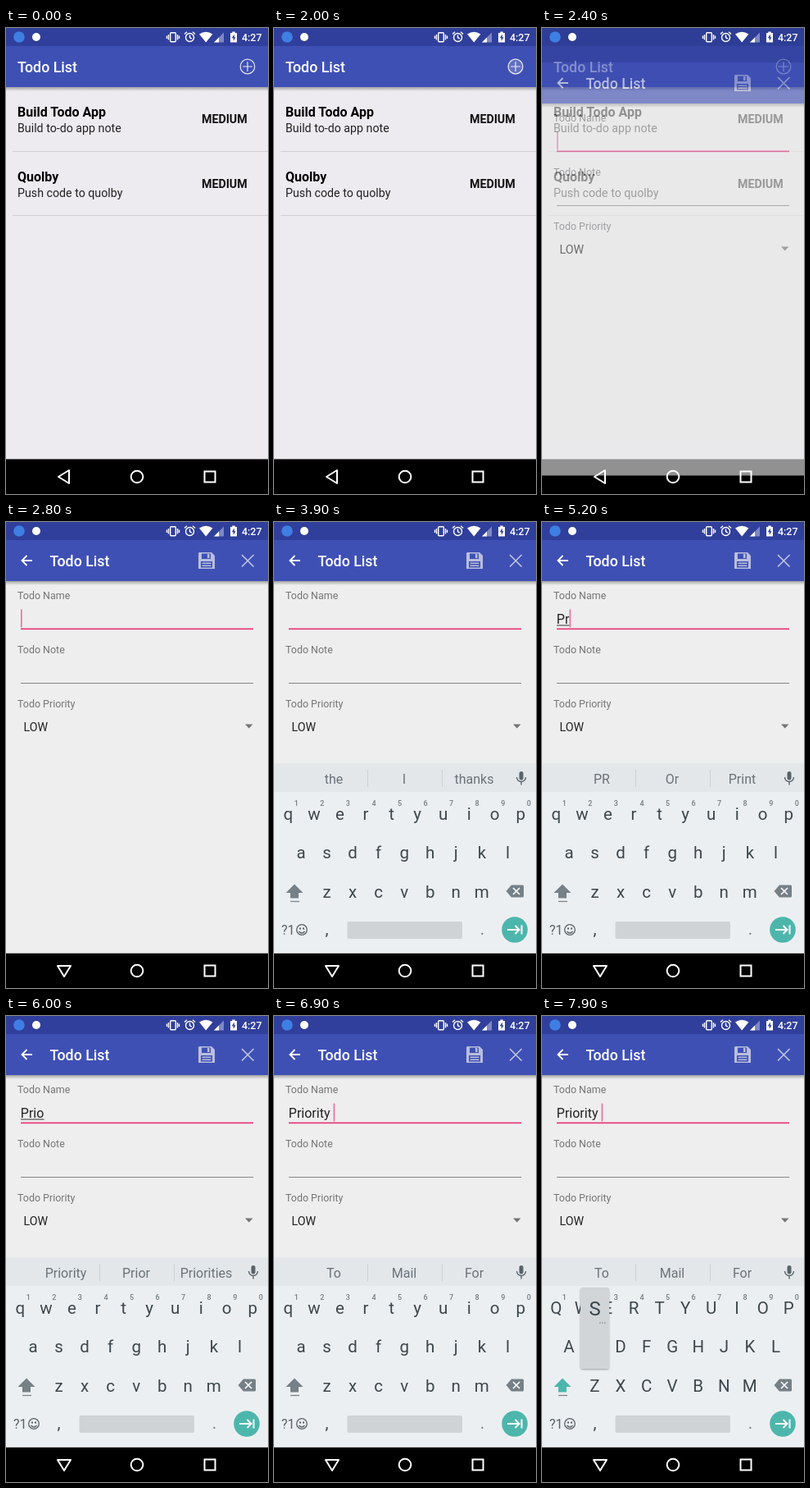
Recreate the animation shown at these times as an HTML page. Size 320x568 px, loop 8000 ms.

```html
<!DOCTYPE html>
<html lang="en">
<head>
<meta charset="utf-8">
<title>Todo List</title>
<style>
  html, body { margin: 0; width: 100%; height: 100%; overflow: hidden; background: #000; }
  svg { display: block; width: 100vw; height: 100vh; font-family: Roboto, sans-serif; }
  text { white-space: pre; }
  .title { font-size: 17.78px; font-weight: 500; fill: #fff; }
  .name { font-size: 16px; font-weight: 700; }
  .body { font-size: 14.22px; fill: #222; }
  .level { font-size: 14.22px; font-weight: 700; fill: #111; }
  .label { font-size: 12.44px; fill: #757575; }
  .mid { text-anchor: middle; }
  .word { font-size: 16px; fill: #697379; }
  .key { font-size: 20.5px; fill: #3c474d; }
  .hint { font-size: 9px; font-weight: 500; fill: #737d82; }
  .line { fill: none; stroke: #fff; }
</style>
</head>
<body>
<svg viewBox="0 0 320 568">
  <defs>
    <linearGradient id="shade" x2="0" y2="1">
      <stop stop-opacity=".32"/><stop offset="1" stop-opacity="0"/>
    </linearGradient>
    <clipPath id="above-nav"><path d="M0 0H320V525.5H0Z"/></clipPath>
    <filter id="lift" x="-20%" y="-10%" width="140%" height="120%">
      <feDropShadow dx="0" dy="1" stdDeviation="1" flood-opacity=".35"/>
    </filter>
    <g id="bars">
      <rect width="320" height="22" fill="#303f9b"/>
      <rect y="22" width="320" height="50" fill="#3f50b5"/>
      <rect y="72" width="320" height="5" fill="url(#shade)"/>
    </g>
  </defs>

  <g id="list">
    <rect width="320" height="525.5" fill="#edebef"/>
    <use href="#bars"/>
    <text class="title" x="14" y="54">Todo List</text>
    <g class="line" stroke-width="1.2" opacity=".85">
      <circle cx="295" cy="47" r="8.8"/><path d="M289 47h12M295 41v12"/>
    </g>
    <circle id="ripple" cx="295" cy="47" fill="#fff" opacity=".18"/>
    <text class="name" x="14" y="108">Build Todo App</text>
    <text class="body" x="14" y="127">Build to-do app note</text>
    <text class="level" x="239" y="116">MEDIUM</text>
    <text class="name" x="14" y="186.5">Quolby</text>
    <text class="body" x="14" y="205.5">Push code to quolby</text>
    <text class="level" x="239" y="194.5">MEDIUM</text>
    <path d="M8 150.5H320M8 228.5H320" stroke="#d2d0d4"/>
    <rect id="dim" width="320" height="525.5"/>
  </g>

  <g id="form">
    <rect width="320" height="525.5" fill="#eee"/>
    <use href="#bars"/>
    <path class="line" stroke-width="1.8" d="M32 47H19.500M25.500 41l-6 6 6 6"/>
    <text class="title" x="53.500" y="54">Todo List</text>
    <g fill="#b9bedf">
      <path fill-rule="evenodd" d="M236 37h15l4 4v16h-20v-19zM239 38.500v6.500h11v-6.500zM238 48v7.500h14V48z"/>
      <path d="M246 39h2.500v5h-2.500zM239.500 49.500h11v1.500h-11zM239.500 52.500h11v1.500h-11z"/>
    </g>
    <path d="M288 40l14.500 14.500M302.500 40L288 54.500" stroke="#c5c9e6" stroke-width="1.5"/>
    <text class="label" x="14" y="94">Todo Name</text>
    <text class="label" x="14" y="160">Todo Note</text>
    <text class="label" x="14" y="226">Todo Priority</text>
    <rect x="18" y="129.500" width="284" height="1.700" fill="#e5397b"/>
    <rect x="18" y="196" width="284" height="1" fill="#858585"/>
    <text id="field" x="17.800" y="124" font-size="16" fill="#222"></text>
    <rect id="composing" x="18" y="125.500" height="1" fill="#333"/>
    <rect id="cursor" y="106.500" width="1.600" height="22" fill="#ee6c9c"/>
    <text class="body" x="21.500" y="255">LOW</text>
    <path d="M292 246.500h9.500l-4.750 5z" fill="#757575"/>
  </g>

  <g clip-path="url(#above-nav)">
    <g id="keyboard">
      <rect y="294.500" width="320" height="231" fill="#eceff1"/>
      <rect y="294.500" width="320" height="34.500" fill="#e4e7ea"/>
      <rect id="word-press" x="32" y="294.500" width="82" height="34.500" fill="#d0d5d9"/>
      <path d="M114.500 302v21M205.500 302v21" stroke="#cbd0d3"/>
      <g id="words"></g>
      <rect x="299.500" y="304" width="5" height="10.500" rx="2.500" fill="#59646a"/>
      <path d="M296.500 311a5.500 5.500 0 0 0 11 0M302 316.500v4" class="line" style="stroke:#59646a" stroke-width="1.400"/>
      <rect id="shift-press" x="6" y="433" width="38" height="36" rx="3" fill="#d3d7da"/>
      <path id="shift" d="M25 441.500l10.500 10.500h-5.500v6.500h-10V452h-5.500z"/>
      <path d="M20 462.500h11" stroke="#7a858a" stroke-width="1.300"/>
      <g id="keys"></g>
      <path d="M290 442.500h13.500q1.500 0 1.500 1.500v12q0 1.500-1.500 1.500H290l-6.500-7.500z" fill="#758087"/>
      <path class="line" stroke-width="1.600" d="M292 446l8 8M300 446l-8 8"/>
      <text x="9" y="503" font-size="16" fill="#566167">?1</text>
      <g fill="none" stroke="#566167" stroke-width="1.300">
        <circle cx="34" cy="497" r="6.300"/><path d="M30.500 499q3.500 4 7 0"/>
      </g>
      <path d="M31 494.500h2v2h-2zM35 494.500h2v2h-2z" fill="#566167"/>
      <rect id="space" x="89.500" y="487" width="140.500" height="21" rx="2"/>
      <text class="key mid" x="64.500" y="503">,</text>
      <text class="key mid" x="254.500" y="503" style="fill:#758087">.</text>
      <circle cx="294" cy="497" r="15.800" fill="#4db6ac"/>
      <path class="line" stroke-width="2" d="M285 497h14M294.500 492l5 5-5 5M302.500 491.500v11"/>
      <g id="popup">
        <rect x="-17.500" y="-79" width="35" height="99" rx="3" fill="#d1d5d8" filter="url(#lift)"/>
        <text id="popup-letter" class="mid" y="-45.500" font-size="24" fill="#37474f"></text>
        <path d="M5.500-36h8" stroke="#8a9499" stroke-width="1.500" stroke-dasharray="1.500 1.500"/>
      </g>
    </g>
  </g>

  <g class="line" stroke-width="2">
    <path id="back" d="M-7 0L6-8V8Z" stroke-linejoin="round"/>
    <circle cx="160" cy="547" r="7.300"/>
    <rect x="242.500" y="540.500" width="13" height="13"/>
  </g>

  <g id="status">
    <circle cx="16" cy="11" r="6.800" fill="#3f7fe4"/>
    <circle cx="37" cy="11" r="5" fill="#fff"/>
    <g class="line" stroke-width="1.400">
      <rect x="200.700" y="5.700" width="6.600" height="11" rx="1"/>
      <path d="M198.500 8v6.500M196.500 9.500v3.500M209.500 8v6.500M211.500 9.500v3.500"/>
      <circle cx="224.500" cy="11.500" r="5"/>
      <path d="M224.500 8.500v3.200l2.300 1.500M218 7.500l3-2.700M231 7.500l-3-2.700"/>
    </g>
    <path d="M236 7.500q8.200-5.500 16.400 0L244.200 17.500z" fill="#fff"/>
    <path d="M254 17.500L266 5.500v12z" fill="#7f88c5"/>
    <path d="M254 17.500l6-6v6z" fill="#fff"/>
    <path d="M274 6h2.300V4.500h3.400V6h2.300v11.500h-8z" fill="#fff"/>
    <path d="M278.800 7.500l-3 4.800h1.900v3.700l2.800-4.800h-1.700z" fill="#303f9b"/>
    <text x="288" y="15.800" font-size="12.440" font-weight="500" fill="#fff">4:27</text>
  </g>
</svg>
<script>
const LOOP = 8000;
const $ = id => document.getElementById(id);
const make = (parent, cls, x, y, content = '') => {
  const node = document.createElementNS('http://www.w3.org/2000/svg', 'text');
  node.setAttribute('class', cls);
  node.setAttribute('x', x);
  node.setAttribute('y', y);
  node.textContent = content;
  return parent.appendChild(node);
};
const set = (id, attrs) => {
  for (const name in attrs) $(id).setAttribute(name, attrs[name]);
};
const show = (id, on) => set(id, { visibility: on ? 'visible' : 'hidden' });

// Each row: start time, then the values held from there on.
const at = (rows, t) => rows.findLast(row => row[0] <= t).slice(1);
const during = (t, ...spans) => spans.some(([from, to]) => t >= from && t < to);

const keys = {};
[['qwertyuiop', 17.3, 363], ['asdfghjkl', 33, 410], ['zxcvbnm', 64.5, 458]].forEach(([row, left, y], r) => {
  [...row].forEach((char, i) => {
    const x = left + i * 31.55;
    keys[char] = { x, y, node: make($('keys'), 'key mid', x, y) };
    if (!r) make($('keys'), 'hint mid', x + 10, 345.5, (i + 1) % 10);
  });
});
const words = [73, 159, 244.5].map(x => make($('words'), 'word mid', x, 318.5));

const ripple = [[0, 0], [2000, 10], [2100, 17], [2200, 22], [2400, 0]];
const enter = [[0, 45, 0, 0], [2200, 38, .1, .01], [2300, 31, .35, .02], [2400, 20, .61, .04],
  [2500, 8, .85, .04], [2600, 2, .97, .02], [2700, 0, 1, 0]];
const backTurn = [[0, 0], [2700, -45], [2800, -90]];
const rise = [[0, 240], [2900, 150], [3000, 45], [3100, 0]];
const typed = [[0, ''], [4700, 'P'], [5100, 'Pr'], [5400, 'Pri'], [5500, 'Prio'], [6500, 'Priority'], [6900, 'Priority ']];
const suggested = [[0, 'the', 'I', 'thanks'], [4800, 'P', 'I', 'Pm'], [5200, 'PR', 'Or', 'Print'],
  [5500, 'Pro', 'Print', 'Prior'], [5600, 'Priority', 'Prior', 'Priorities'], [6600, 'To', 'Mail', 'For']];
const cursorOn = [[0, true], [2900, false], [3400, true], [3900, false], [4400, true],
  [6000, false], [6500, true], [7400, false], [7900, true]];
const pressed = [[0, ''], [4600, 'p'], [4700, ''], [5000, 'r'], [5100, ''], [5300, 'i'],
  [5400, 'o'], [5500, ''], [7900, 's']];

function render(t) {
  const [drop, alpha, dim] = at(enter, t);
  set('ripple', { r: at(ripple, t)[0] });
  set('dim', { opacity: dim });
  set('form', { transform: `translate(0 ${drop})`, opacity: alpha });
  set('back', { transform: `translate(71 547) rotate(${at(backTurn, t)[0]})` });
  set('keyboard', { transform: `translate(0 ${at(rise, t)[0]})` });

  const text = at(typed, t)[0];
  $('field').textContent = text;
  const width = text ? $('field').getComputedTextLength() : 0;
  set('composing', { width: t < 6500 ? width : 0 });
  set('cursor', { x: 18 + width });
  show('cursor', at(cursorOn, t)[0]);

  const caps = during(t, [4200, 4700], [7400, LOOP]);
  for (const char in keys) keys[char].node.textContent = caps ? char.toUpperCase() : char;
  at(suggested, t).forEach((word, i) => { words[i].textContent = word; });
  set('shift', { fill: caps ? '#4db6ac' : '#758087' });
  set('space', { fill: during(t, [6800, 6900]) ? '#b4babe' : '#cfd3d6' });
  show('shift-press', during(t, [4100, 4300], [7300, 7400]));
  show('word-press', during(t, [6400, 6500]));

  const char = at(pressed, t)[0];
  show('popup', char);
  if (char) {
    const { x, y } = keys[char];
    set('popup', { transform: `translate(${x} ${y - 7 + 7})` });
    $('popup-letter').textContent = caps ? char.toUpperCase() : char;
  }
}

const start = performance.now();
function tick() {
  render((performance.now() - start) % LOOP);
  requestAnimationFrame(tick);
}
tick();
</script>
</body>
</html>
```
